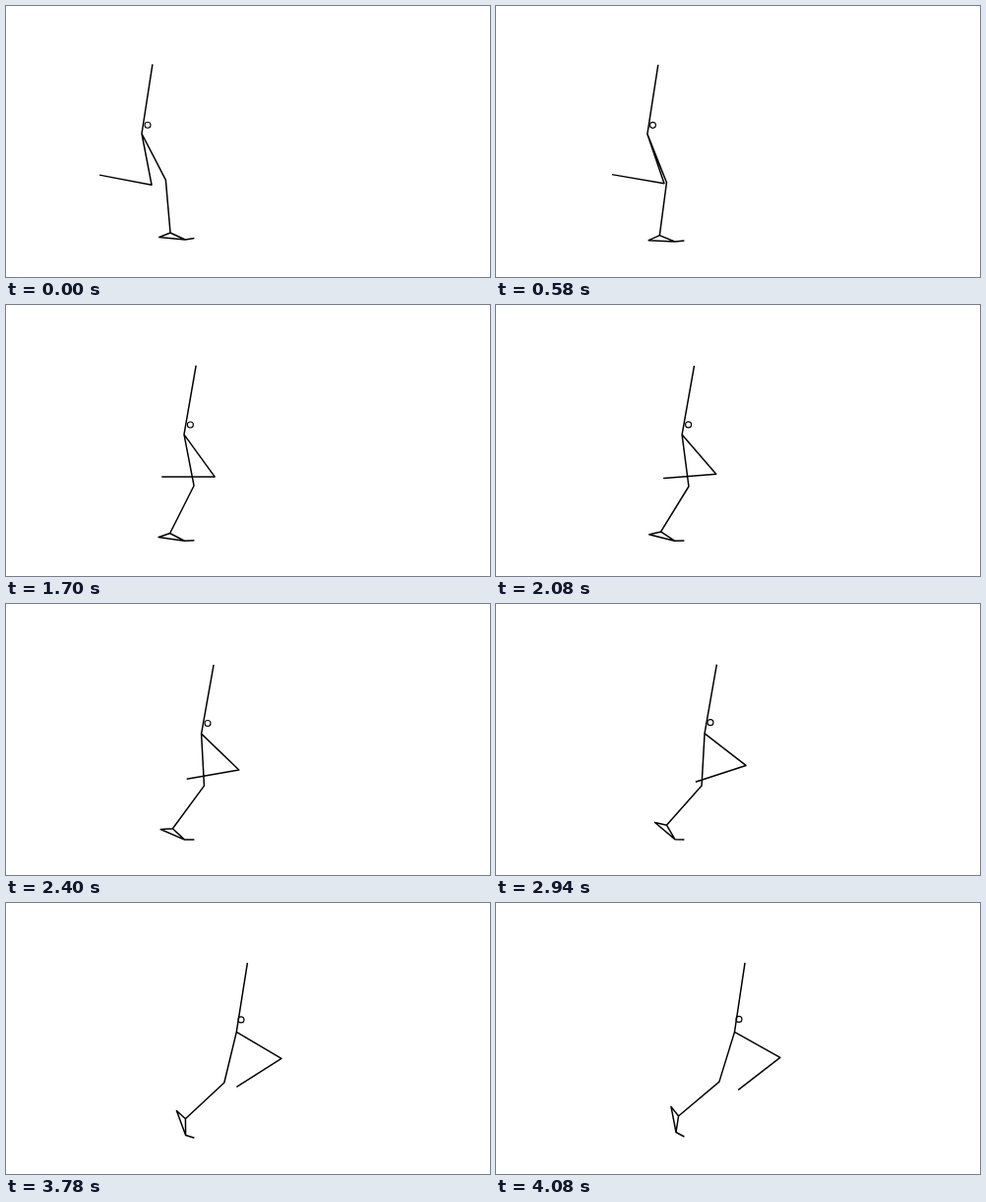
These frames come from a looping animation (492 px wide and 276 px high, 4100 ms). An HTML page:

```html
<!DOCTYPE html>
<html lang="en">
<head>
<meta charset="utf-8">
<title>Walking stick figure</title>
<style>
  html, body { margin: 0; width: 100%; height: 100%; overflow: hidden; background: #fff; }
  svg { display: block; width: 492px; height: 276px; }
  path, circle { fill: none; stroke: #000; }
  path { stroke-width: 1.5; stroke-linejoin: round; }
  circle { stroke-width: 1.1; }
</style>
</head>
<body>
<svg viewBox="0 0 492 276">
  <path id="body"/>
  <circle id="mass" r="3"/>
</svg>
<script>
const LOOP = 4100, LAST = 88;
const TRUNK = 71.4, THIGH = 53.1, SHANK = 53.9;
const SOLE = 26.6, INSTEP = 16.7, INSTEP_ANGLE = 19.6, TOE_X = 191.4;

// Polynomial in u = 0..1 through evenly spaced values
function curve(...values) {
  const end = values.length - 1;
  return u => values.reduce((sum, value, i) => {
    for (let j = 0; j <= end; j++) if (j !== i) value *= (u * end - j) / (i - j);
    return sum + value;
  }, 0);
}

const hipX = curve(138, 164.1, 189.1, 215.8, 242.5);
const hipY = curve(130, 131, 132.1, 131.8, 131.4);
const ballX = curve(182.2, 181.5, 183);
const ballY = curve(238, 240.3, 240.2, 239.4, 233.5);
const toeY = curve(236.5, 239.6, 239.9, 240.1, 238);

// Centre of mass relative to the hip
const massX = curve(6, 5.8, 6.5, 5.7, 4.5);
const massY = curve(-8.8, -10.2, -13);

// Limb angles from straight down, forwards positive; the foot's from flat
const lean = curve(8.8, 9.15, 10, 9.8, 8.5);
const thigh = curve(27.3, 17.8, 7.4, -5, -17.1);
const swingThigh = curve(10.9, 25.1, 40.8, 53.7, 60.8);
const swingShank = curve(-100.7, -97, -85.5, -69.5, -52.2);
const footLift = curve(5.3, 2.3, 14, 45, 79.1);

// End of a segment hanging from a joint
function hang([x, y], length, degrees) {
  const a = degrees * Math.PI / 180;
  return [x + length * Math.sin(a), y + length * Math.cos(a)];
}

const line = (...pts) => "M" + pts.map(p => p.map(c => c.toFixed(2)).join(" ")).join("L");

// Poses are held for 20, 100 and 20 ms in turn
function poseAt(ms) {
  const rest = ms % 140;
  const n = 3 * Math.floor(ms / 140) + (rest < 20 ? 0 : rest < 120 ? 1 : 2);
  return Math.min(n, LAST) / LAST;
}

const body = document.getElementById("body");
const mass = document.getElementById("mass");

function draw(u) {
  const hip = [hipX(u), hipY(u)];
  const head = hang(hip, TRUNK, 180 - lean(u));
  const swingKnee = hang(hip, THIGH, swingThigh(u));
  const swingAnkle = hang(swingKnee, SHANK, swingShank(u));
  const knee = hang(hip, THIGH, thigh(u));

  // The standing foot is a rigid triangle rolling over its ball
  const ball = [ballX(u), ballY(u)];
  const heel = hang(ball, SOLE, -90 - footLift(u));
  const ankle = hang(ball, INSTEP, -90 - footLift(u) - INSTEP_ANGLE);

  body.setAttribute("d",
    line(head, hip, swingKnee, swingAnkle) +
    line(hip, knee, ankle, heel, ball, ankle) +
    line(ball, [TOE_X, toeY(u)]));
  mass.setAttribute("cx", hip[0] + massX(u));
  mass.setAttribute("cy", hip[1] + massY(u));
}

const start = performance.now();
function tick() {
  draw(poseAt((performance.now() - start) % LOOP));
  requestAnimationFrame(tick);
}
tick();
</script>
</body>
</html>
```
